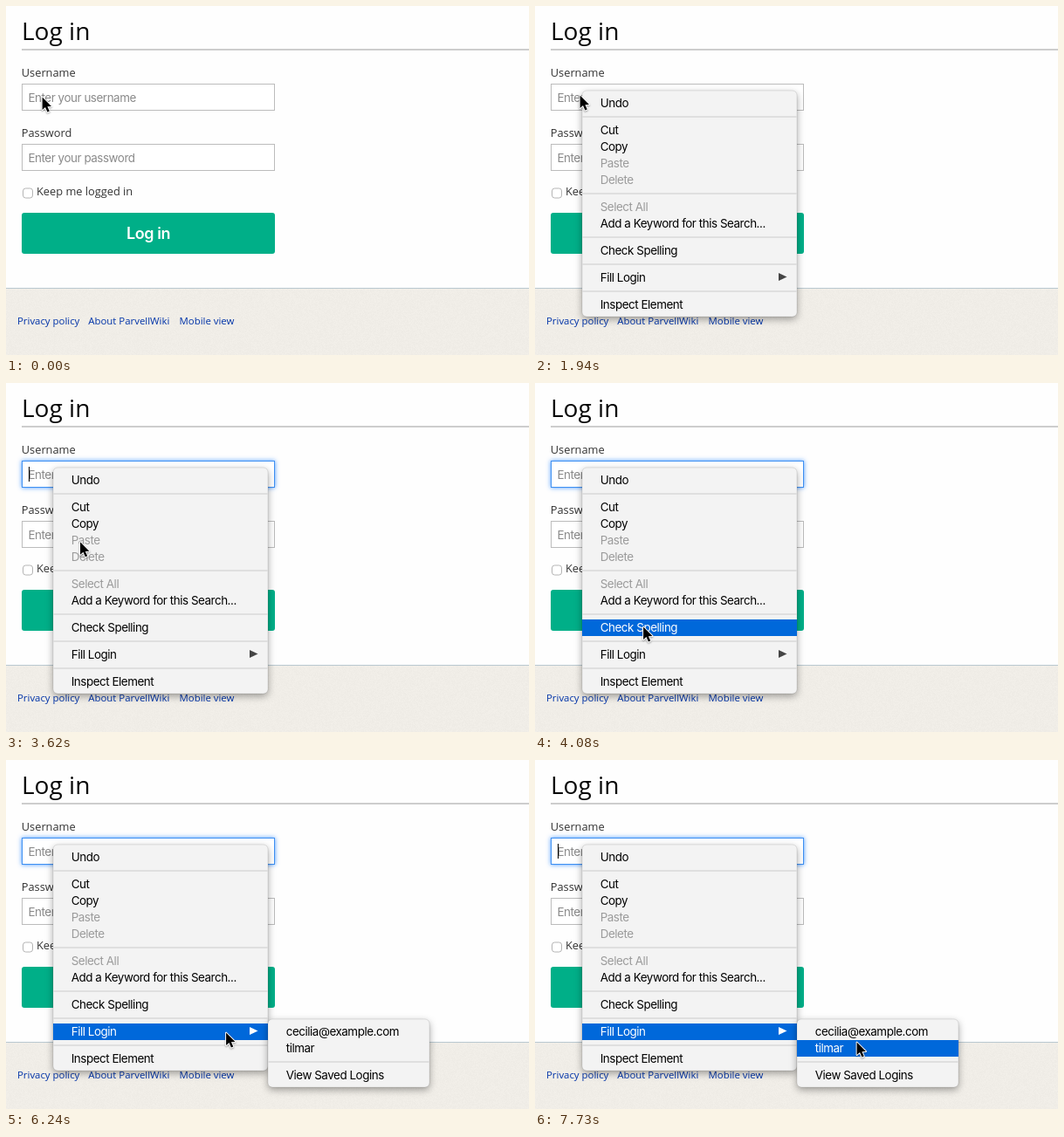
An HTML page with a canvas for the animation above (8 s loop, 599 by 400 pixels).

```html
<!DOCTYPE html>
<html lang="en">
<head>
<meta charset="utf-8">
<title>Log in</title>
<style>
  html, body { margin: 0; width: 100%; height: 100%; overflow: hidden; background: #fff; }
  canvas { display: block; }
</style>
</head>
<body>
<canvas id="stage" width="599" height="400"></canvas>
<script>
const ctx = document.getElementById('stage').getContext('2d');
const LOOP = 8000, STEP = 57, BLINK = 545;
const BEAM_ON = 520, MENU_OPEN = 1830, BEAM_OFF = 1940, FOCUS = 2000, LOGINS_OPEN = 4650;
const ROW = 19, GAP = 12;
const BODY = '"Open Sans", "Noto Sans", sans-serif';
const UI = 'Inter, Roboto, sans-serif';
const BLUE = '#0068da';

// Lays out labels in rows; '-' is a separator, a leading '~' a disabled row, a trailing '>' a submenu
function makeMenu(x, y, w, labels) {
  const menu = { x, y, w, seps: [], items: [] };
  let top = y + 5;
  for (const label of labels) {
    if (label === '-') {
      menu.seps.push(top + GAP / 2);
      top += GAP;
    } else {
      menu.items.push({
        top,
        label: label.replace(/^~|>$/g, ''),
        off: label.startsWith('~'),
        arrow: label.endsWith('>')
      });
      top += ROW;
    }
  }
  menu.h = top + 4 - y;
  return menu;
}

const mainMenu = makeMenu(54, 97, 246, [
  'Undo', '-', 'Cut', 'Copy', '~Paste', '~Delete', '-', '~Select All',
  'Add a Keyword for this Search...', '-', 'Check Spelling', '-', 'Fill Login>', '-', 'Inspect Element'
]);
const loginMenu = makeMenu(300, 297, 185, ['cecilia@example.com', 'tilmar', '-', 'View Saved Logins']);
const fillLogin = mainMenu.items.find(i => i.arrow);

const origin = { x: 41, y: 104 };
const moves = [
  { from: 63, to: 290, x: 46, y: 103 },
  { from: 1000, to: 1230, x: 51, y: 102 },
  { from: 3210, to: 3330, x: 60, y: 121 },
  { from: 3330, to: 4080, x: 123.5, y: 279 },
  { from: 4080, to: 4710, x: 130, y: 308 },
  { from: 5550, to: 6240, x: 251.5, y: 312 },
  { from: 6240, to: 7730, x: 368, y: 323, slow: 1.5 }
];

// The pointer advances in discrete steps along each move
function pointerAt(t) {
  let p = origin;
  for (const { from, to, x, y, slow = 1 } of moves) {
    if (t < from) break;
    const n = Math.round((to - from) / STEP);
    const k = Math.min(1, Math.floor((t - from) / (to - from) * n) / n);
    const e = 1 - (1 - k) ** slow;
    p = { x: p.x + (x - p.x) * e, y: p.y + (y - p.y) * e };
  }
  return p;
}

function text(str, x, y, font, color, align = 'left') {
  ctx.font = font;
  ctx.letterSpacing = font.endsWith(UI) ? '-0.45px' : '0px';
  ctx.fillStyle = color;
  ctx.textAlign = align;
  ctx.fillText(str, x, y);
}

function rect(x, y, w, h, color) {
  ctx.fillStyle = color;
  ctx.fillRect(x, y, w, h);
}

function roundRect(x, y, w, h, r, fill, stroke, line = 1) {
  ctx.beginPath();
  ctx.roundRect(x, y, w, h, r);
  ctx.fillStyle = fill;
  ctx.fill();
  if (!stroke) return;
  ctx.shadowColor = 'transparent';
  ctx.lineWidth = line;
  ctx.strokeStyle = stroke;
  ctx.stroke();
}

function polygon(points) {
  ctx.beginPath();
  points.forEach(([x, y]) => ctx.lineTo(x, y));
  ctx.closePath();
}

function shadow(color, blur, dy) {
  ctx.shadowColor = color;
  ctx.shadowBlur = blur;
  ctx.shadowOffsetY = dy;
}

function makePaper(w, h) {
  const c = document.createElement('canvas');
  c.width = w;
  c.height = h;
  const g = c.getContext('2d'), img = g.createImageData(w, h);
  let seed = 7;
  for (let i = 0; i < img.data.length; i += 4) {
    seed = (seed * 16807) % 2147483647;
    const n = (seed / 2147483647 - 0.5) * 5;
    img.data.set([240 + n, 237 + n, 231 + n, 255], i);
  }
  g.putImageData(img, 0, 0);
  return c;
}
const paper = makePaper(599, 76);

function field(y, hint, focused) {
  ctx.save();
  if (focused) shadow('rgba(50,140,255,0.9)', 5, 0);
  rect(18, y, 290, 31, focused ? '#3d8ff2' : '#bcbcbc');
  ctx.restore();
  rect(19, y + 1, 288, 29, '#fff');
  text(hint, 25.5, y + 21, '13.4px ' + UI, '#8a8a8a');
}

function drawPage(focused) {
  const label = '12.8px ' + BODY, link = '11.4px ' + BODY;
  rect(0, 0, 599, 400, '#fefefe');
  text('Log in', 18, 39, '500 28px ' + BODY, '#060606');
  rect(18, 49, 581, 2, '#cdcdcd');

  text('Username', 17.8, 81, label, '#333');
  field(89, 'Enter your username', focused);
  text('Password', 17.8, 150, label, '#333');
  field(158, 'Enter your password', false);

  roundRect(19.5, 209, 11, 11, 3, '#fff', '#b4b4b4');
  text('Keep me logged in', 35, 217, label, '#333');
  roundRect(18, 237, 290, 47, 3, '#00af88');
  text('Log in', 163, 267, '600 18px ' + UI, '#fff', 'center');

  ctx.drawImage(paper, 0, 324);
  rect(0, 323, 599, 1, '#b9c8d0');
  text('Privacy policy', 13, 365, link, '#0033a8');
  text('About ParvellWiki', 94.3, 365, link, '#0033a8');
  text('Mobile view', 198.5, 365, link, '#0033a8');
}

function drawMenu({ x, y, w, h, seps, items }, active) {
  ctx.save();
  shadow('rgba(0,0,0,0.36)', 9, 3);
  roundRect(x, y, w, h, 5, '#f3f3f3', 'rgba(0,0,0,0.2)', 0.5);
  ctx.restore();

  seps.forEach(sep => rect(x, sep - 1, w, 2, '#dfdfdf'));
  for (const item of items) {
    const on = item === active;
    const color = on ? '#fff' : item.off ? '#9b9b9b' : '#000';
    if (on) rect(x, item.top, w, ROW, BLUE);
    text(item.label, x + 20.7, item.top + 14, '13.4px ' + UI, color);
    if (item.arrow) {
      const right = x + w - 11.5, mid = item.top + 8.5;
      polygon([[right - 9.5, mid - 4.5], [right, mid], [right - 9.5, mid + 4.5]]);
      ctx.fillStyle = on ? '#fff' : '#444';
      ctx.fill();
    }
  }
}

function hovered(menu, p) {
  if (p.x < menu.x || p.x > menu.x + menu.w) return null;
  return menu.items.find(i => !i.off && p.y >= i.top && p.y < i.top + ROW + 0.5);
}

function drawArrow(p) {
  ctx.save();
  ctx.translate(p.x + 0.6, p.y + 0.6);
  polygon([[0, 0], [0, 14.5], [3.4, 11.4], [5.8, 17], [8.2, 16], [5.8, 10.6], [10.4, 10.4]]);
  shadow('rgba(0,0,0,0.35)', 2, 1);
  ctx.lineJoin = 'round';
  ctx.lineWidth = 2;
  ctx.strokeStyle = '#fff';
  ctx.stroke();
  ctx.shadowColor = 'transparent';
  ctx.fillStyle = '#000';
  ctx.fill();
  ctx.restore();
}

function drawBeam(p) {
  ctx.save();
  ctx.translate(Math.round(p.x) + 1.5, 104);
  ctx.lineWidth = 1;
  ctx.strokeStyle = '#333';
  ctx.beginPath();
  for (const side of [-1, 1]) {
    ctx.moveTo(side * 3, -7.5);
    ctx.quadraticCurveTo(0, -7.5, 0, -5);
    ctx.lineTo(0, 5);
    ctx.quadraticCurveTo(0, 7.5, side * 3, 7.5);
  }
  ctx.moveTo(-2, 2.5);
  ctx.lineTo(2, 2.5);
  ctx.stroke();
  ctx.restore();
}

function draw(t) {
  const p = pointerAt(t);
  const focused = t >= FOCUS;
  drawPage(focused);
  if (focused && Math.floor((t - FOCUS) / BLINK) % 2 === 0) rect(26, 96, 1, 17, '#000');

  if (t >= MENU_OPEN) drawMenu(mainMenu, p.x > loginMenu.x ? fillLogin : hovered(mainMenu, p));
  if (t >= LOGINS_OPEN) drawMenu(loginMenu, hovered(loginMenu, p));

  if (t >= BEAM_ON && t < BEAM_OFF) drawBeam(p);
  else drawArrow(p);
}

const start = performance.now();
function tick() {
  draw((performance.now() - start) % LOOP);
  requestAnimationFrame(tick);
}
tick();
</script>
</body>
</html>
```
